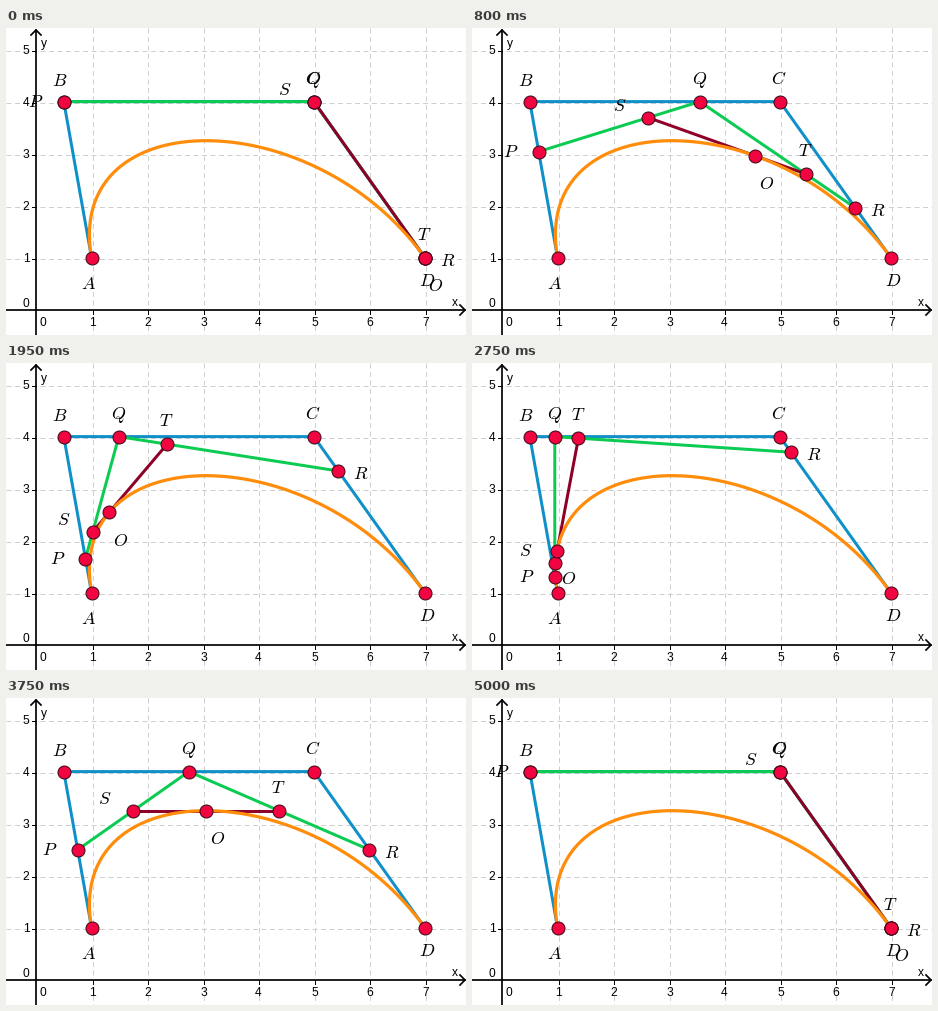
Animation, 460 px wide and 307 px high, one loop 5050 ms. Source, as a matplotlib script:

```python
import numpy as np
import matplotlib.pyplot as plt
from matplotlib.animation import FuncAnimation

W, H, DPI = 460, 307, 64
PX = 72 / DPI                      # points per pixel
X0, Y0, UX, UY = 30, 282, 55.57, 52.1
FRAMES, HALF = 101, 50

BLUE, GREEN, MAROON = "#1090c8", "#0bcb52", "#8f0028"
ORANGE, RED = "#ff8c0a", "#f20440"

plt.rcParams["mathtext.fontset"] = "cm"
plt.rcParams["font.family"] = "Liberation Sans"

fig = plt.figure(figsize=(W / DPI, H / DPI), dpi=DPI, facecolor="white")
ax = fig.add_axes([0, 0, 1, 1])
ax.set_xlim(0, W)
ax.set_ylim(H, 0)
ax.axis("off")


def to_px(p):
    p = np.asarray(p, float)
    return np.stack([X0 + UX * p[..., 0], Y0 - UY * p[..., 1]], axis=-1)


def line(pts, color, width, z, **kw):
    x, y = np.transpose(pts)
    return ax.plot(x, y, color=color, lw=width * PX, zorder=z, **kw)[0]


def tick_text(x, y, s):
    ax.text(x, y, s, fontsize=12 * PX, ha="center", va="baseline", zorder=2)


def lerp(a, b, t):
    return a + (b - a) * t


def draw_axes():
    dash = dict(dashes=(5, 3.5), dash_capstyle="butt")
    for n in range(1, 8):
        x = round(X0 + UX * n) + 0.5
        line([(x, 0), (x, H)], "#cfcfcf", 1, 0, **dash)
        line([(x, Y0), (x, Y0 + 4)], "black", 1, 1)
        tick_text(x, 298, str(n))
    for n in range(1, 6):
        y = round(Y0 - UY * n) + 0.5
        line([(0, y), (W, y)], "#cfcfcf", 1, 0, **dash)
        line([(X0 - 4, y), (X0, y)], "black", 1, 1)
        tick_text(20, y + 4, str(n))
    tick_text(20, 279, "0")
    tick_text(37, 298, "0")
    tick_text(449, 278, "x")
    tick_text(37.5, 19, "y")
    line([(0, Y0), (W - 1, Y0)], "black", 1.7, 1)
    line([(X0, H), (X0, 2)], "black", 1.7, 1)
    line([(W - 6, Y0 - 5), (W - 1, Y0), (W - 6, Y0 + 5)], "black", 1.7, 1)
    line([(X0 - 5, 7), (X0, 2), (X0 + 5, 7)], "black", 1.7, 1)


# Label centres relative to their points, in pixels
OFFSETS = {
    "A": (-3, 25), "B": (-4, -22), "C": (-1, -23.5), "D": (2, 22.5),
    "P": (-28, -1), "Q": (-0.5, -23.5), "R": (22.5, 2),
    "S": (-29, -13), "T": (-0.5, -24), "O": (11, 27.5),
}
FIXED = dict(zip("ABCD", to_px([(1, 1), (0.5, 4), (5, 4), (7, 1)])))


def casteljau(t):
    a, b, c, d = FIXED.values()
    p, q, r = lerp(a, b, t), lerp(b, c, t), lerp(c, d, t)
    s, u = lerp(p, q, t), lerp(q, r, t)
    return {"P": p, "Q": q, "R": r, "S": s, "T": u, "O": lerp(s, u, t)}


draw_axes()
line(list(FIXED.values()), BLUE, 3, 3)
green = line([(0, 0)], GREEN, 3, 4)
maroon = line([(0, 0)], MAROON, 3, 5)
curve = [casteljau(t)["O"] for t in np.linspace(0, 1, 160)]
line(curve, ORANGE, 3.2, 6)

dots = line([(0, 0)], RED, 0, 7, marker="o", ms=13 * PX,
            mec="#3a0a18", mew=1 * PX)
labels = {k: ax.text(0, 0, f"${k}$", fontsize=17.8 * PX, ha="center",
                     va="baseline", zorder=8) for k in OFFSETS}


def update(i):
    t = abs(1 - i / HALF)
    moving = casteljau(t)
    green.set_data(*np.transpose([moving[k] for k in "PQR"]))
    maroon.set_data(*np.transpose([moving[k] for k in "ST"]))
    points = {**FIXED, **moving}
    dots.set_data(*np.transpose(list(points.values())))
    for k, (dx, dy) in OFFSETS.items():
        x, y = points[k]
        labels[k].set_position((x + dx, y + dy + 6))
    return [green, maroon, dots, *labels.values()]


anim = FuncAnimation(fig, update, frames=FRAMES, interval=50,
                     init_func=lambda: update(0), repeat=True,
                     repeat_delay=0, blit=False)
plt.show()
```
